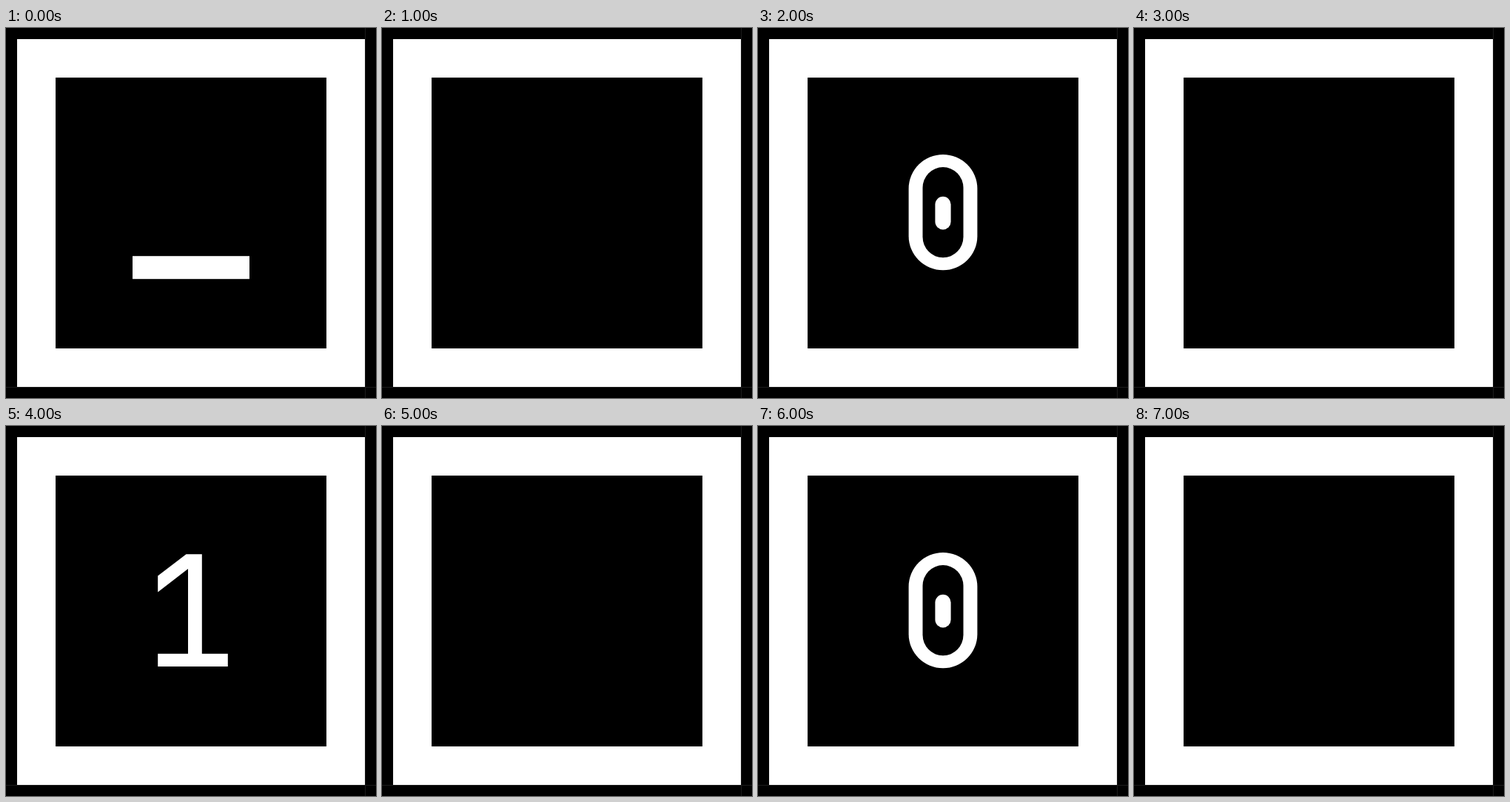
These frames come from a looping animation (500x500 px, 8000 ms). An HTML page:

```html
<!DOCTYPE html>
<html lang="en">
<head>
<meta charset="utf-8">
<title>Blinking digits</title>
<style>
  html, body { margin: 0; width: 100%; height: 100%; overflow: hidden; background: #000; }
  svg { display: block; width: 100vw; height: 100vh; }
  .glyph { fill: #fff; visibility: hidden; animation: 8s step-end infinite; }
  .cursor { animation-name: cursor; }
  .zero { animation-name: zero; }
  .one { animation-name: one; }
  @keyframes cursor {
    0% { visibility: visible; }
    12.5%, 100% { visibility: hidden; }
  }
  @keyframes zero {
    0%, 37.5%, 87.5%, 100% { visibility: hidden; }
    25%, 75% { visibility: visible; }
  }
  @keyframes one {
    0%, 62.5%, 100% { visibility: hidden; }
    50% { visibility: visible; }
  }
</style>
</head>
<body>
<svg viewBox="0 0 500 500">
  <path fill="#1c1c1c" d="M485 0h1v500h-1zM0 485h500v1H0z"/>
  <path fill="#fff" fill-rule="evenodd" d="M15 15h470v470H15zM67 67v366h366V67z"/>

  <rect class="glyph cursor" x="171" y="308.2" width="158" height="31"/>

  <g class="glyph zero">
    <rect x="203.6" y="171" width="92.8" height="156.2" rx="46.4" ry="46"/>
    <rect x="222.5" y="188" width="55" height="122.3" rx="27.5" ry="28" fill="#000"/>
    <rect x="239.4" y="227.8" width="21.2" height="44.6" rx="10.6"/>
  </g>

  <path class="glyph one" d="M205.2 325v-17.2H246V193L205.2 224.5V202.6L243.5 173.2H264.8V307.8H299.8V325z"/>
</svg>
</body>
</html>
```
